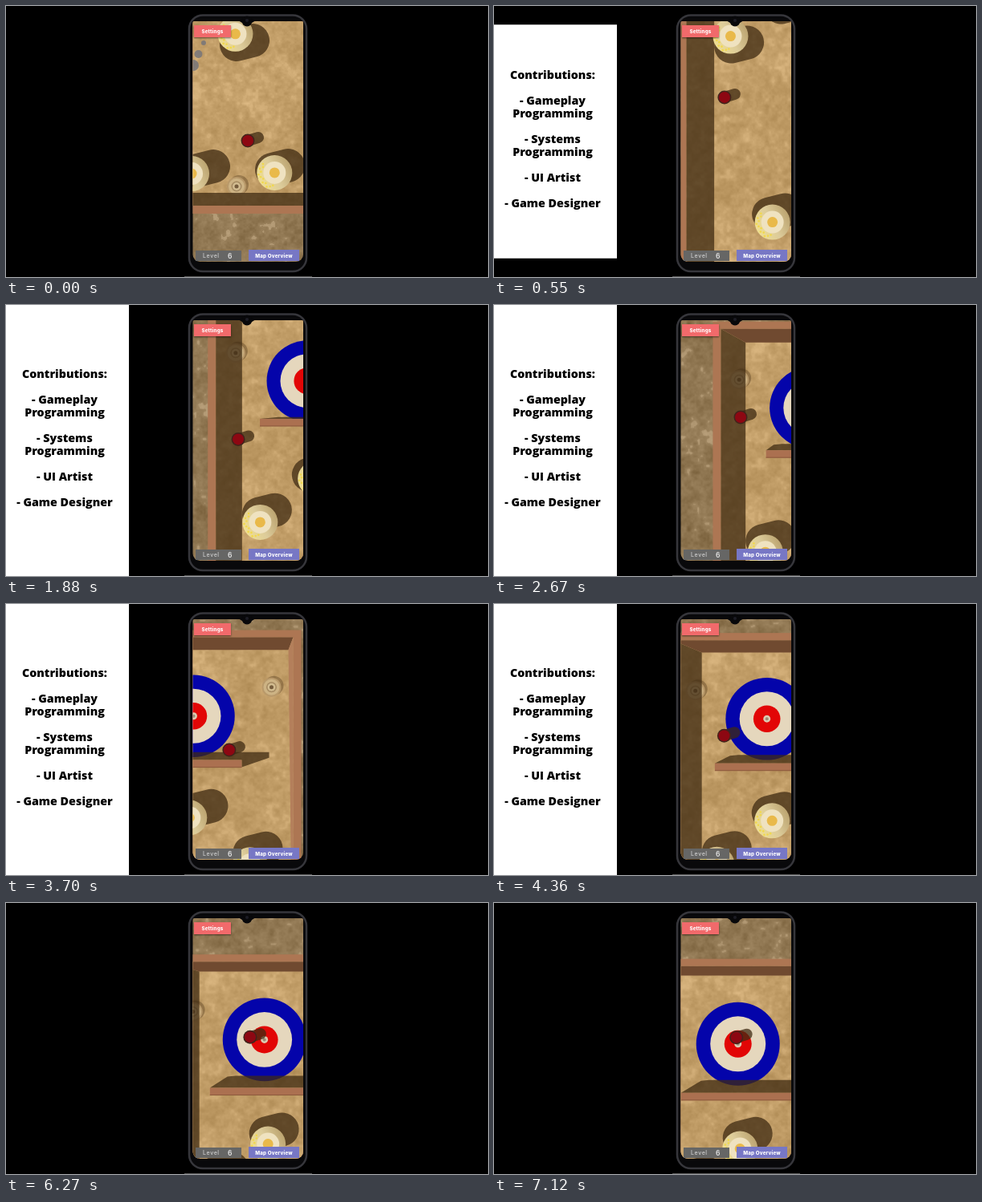
An HTML page with a canvas that plays this animation: 600 px wide and 338 px high, repeating every 7.15 s.

```html
<!DOCTYPE html>
<html lang="en">
<head>
<meta charset="utf-8">
<title>Curling puzzle showcase</title>
<style>
  html, body { margin: 0; width: 100%; height: 100%; overflow: hidden; background: #000; }
  #stage { position: relative; width: 600px; height: 338px; overflow: hidden; background: #000; }
  #stage > * { position: absolute; box-sizing: border-box; }
  canvas { left: 0; top: 0; }
  .ui { font: 800 6.2px/15px Inter, "Open Sans", sans-serif; letter-spacing: .2px; color: #fff; text-align: center; white-space: nowrap; }
  #settings { left: 234px; top: 24px; width: 46px; height: 15px; background: #f16a6b; box-shadow: 0 1px 2px #0008; }
  #map { left: 302px; top: 304px; width: 63px; height: 14px; background: #7777c5; }
  #level { left: 236px; top: 305px; width: 57px; height: 13px; background: #666665; color: #cfcfcf;
    font-weight: 500; font-size: 7px; line-height: 14px; letter-spacing: .6px; text-align: left; padding-left: 9px; }
  #level b { position: absolute; left: 40px; font-size: 8.5px; font-weight: 600; color: #e4e4e4; }
  #panel { left: 0; top: 0; width: 153px; height: 338px; background: #fff; color: #000; margin: 0;
    padding: 78px 7px 0 0; font: 800 14.25px/16px "Open Sans", "Noto Sans", sans-serif; text-align: center; white-space: pre; }
</style>
</head>
<body>
<div id="stage">
  <canvas id="view" width="600" height="338"></canvas>
  <div id="settings" class="ui">Settings</div>
  <div id="level" class="ui">Level<b>6</b></div>
  <div id="map" class="ui">Map Overview</div>
  <div id="panel">Contributions:

- Gameplay
Programming

- Systems
Programming

- UI Artist

- Game Designer</div>
</div>
<script>
const LOOP = 7150, LAG = 200, MID_X = 301, MID_Y = 168;
const g = document.getElementById('view').getContext('2d');
const panel = document.getElementById('panel');

// Shots and bounces of the rock: time, then place relative to the bullseye
const PATH = [
  [60, 1, 495], [805, -104, 92], [1330, -20, 76], [2000, -100, 72], [2456, -100, 72], [2891, -74, -50],
  [3443, 104, 6], [3720, 40, 45], [4710, -104, 8], [5120, -59, 9], [7120, -2, -8]
];
const CUPS = [[2, 117], [-60, 166], [70, 170], [31, 531], [-62, 532], [-13, 375]];
const COINS = [[-89, -35], [97, -36], [-13, 552]];
const SHADE = 'rgba(63,42,18,.74)';

const clamp = v => Math.max(0, Math.min(1, v));
const ease = v => { v = clamp(v); return v * v * (3 - 2 * v); };
// Raised things spread away from the middle of the screen
const rise = (v, mid, k) => mid + (v - mid) * k;

function rockAt(t) {
  let i = 0;
  while (i < PATH.length - 2 && PATH[i + 1][0] <= t) i++;
  const [t0, x0, y0] = PATH[i], [t1, x1, y1] = PATH[i + 1];
  let u = clamp((t - t0) / (t1 - t0));
  if (i === PATH.length - 2) u = 1 - (1 - u) ** 1.5; // glides to rest
  return [x0 + (x1 - x0) * u, y0 + (y1 - y0) * u];
}

// The camera follows the mean place of the rock over the last LAG ms
function bullseyeAt(t) {
  const n = 20;
  let x = MID_X, y = MID_Y;
  for (let i = 0; i < n; i++) {
    const [rx, ry] = rockAt(t - LAG * (i + .5) / n);
    x -= rx / n;
    y -= ry / n;
  }
  return [x, y];
}

function seeded(seed) {
  return () => (seed = (seed * 16807) % 2147483647) / 2147483647;
}

// Tiling mottled ground made from wrapped value noise
function ground(base, amount, streak, seed) {
  const size = 256, tile = document.createElement('canvas');
  tile.width = tile.height = size;
  const c = tile.getContext('2d'), img = c.createImageData(size, size), rnd = seeded(seed);
  const layers = [8, 32, 64, 128].map(n => ({ n, v: Array.from({ length: n * n }, () => rnd() - .5) }));
  const sample = ({ n, v }, x, y) => {
    const fx = x * n / size, fy = y * n / size, x0 = Math.floor(fx), y0 = Math.floor(fy);
    const u = ease(fx - x0), w = ease(fy - y0), at = (p, q) => v[(q % n) * n + p % n];
    return (at(x0, y0) * (1 - u) + at(x0 + 1, y0) * u) * (1 - w)
      + (at(x0, y0 + 1) * (1 - u) + at(x0 + 1, y0 + 1) * u) * w;
  };
  for (let y = 0; y < size; y++) for (let x = 0; x < size; x++) {
    const [a, b, d, e] = layers.map(l => sample(l, x, y));
    let n = (a * .7 + b + d * .7 + e * .4) * amount;
    if (b + d * .8 + a * .5 > .42) n += streak;
    const o = (y * size + x) * 4;
    base.forEach((v, k) => img.data[o + k] = v + n);
    img.data[o + 3] = 255;
  }
  c.putImageData(img, 0, 0);
  return g.createPattern(tile, 'repeat');
}
const sand = ground([193, 157, 103], 19, 4, 11);
const rubble = ground([147, 122, 85], 22, 18, 77);

function disc(x, y, r, fill) {
  g.beginPath();
  g.arc(x, y, r, 0, 7);
  g.fillStyle = fill;
  g.fill();
}
function poly(fill, ...pts) {
  g.beginPath();
  pts.forEach(p => g.lineTo(...p));
  g.fillStyle = fill;
  g.fill();
}
function box(x0, y0, x1, y1, fill) {
  g.fillStyle = fill;
  g.fillRect(x0, y0, x1 - x0, y1 - y0);
}
function texture(x0, y0, x1, y1, pattern, cx, cy) {
  pattern.setTransform(new DOMMatrix().translate(cx, cy));
  box(x0, y0, x1, y1, pattern);
}
// A round shadow drawn out from the foot of a thing
function shadow(x, y, dx, dy, r) {
  g.beginPath();
  g.moveTo(x, y);
  g.lineTo(x + dx, y + dy);
  g.lineCap = 'round';
  g.lineWidth = 2 * r;
  g.strokeStyle = SHADE;
  g.stroke();
}

function arena(cx, cy) {
  const left = rise(cx - 110, MID_X, 1.1), top = rise(cy - 94.5, MID_Y, 1.03);
  const right = cx + 124, bottom = cy + 576;
  const inL = cx - 81, inT = rise(cy - 92, MID_Y, .92), inR = cx + 118, inB = cy + 560;
  texture(230, 17, 372, 321, rubble, cx, cy);
  box(left - 10, top - 9, right + 10, bottom + 10, '#ad7653');
  texture(left, top, right, bottom, sand, cx, cy);
  COINS.forEach(([x, y]) => coin(cx + x, cy + y));
  poly(SHADE, [left, top], [inL, inT], [inL, inB], [left, bottom]);
  poly('#704a30', [left, top], [right, top], [inR, inT], [inL, inT]);
  poly('#b47f5b', [right, top], [inR, inT], [inR + 8, inB], [right, bottom]);
  poly(SHADE, [left, bottom], [inL, inB], [inR, inB], [right, bottom]);
}

function bullseye(cx, cy) {
  const k = 1 + (cy - 176) * .0004;
  [[52, '#0404aa'], [34.5, '#e5d7bd'], [17, '#e20606'], [4.5, '#dccbb2'], [2, '#9b8b78']]
    .forEach(([r, fill]) => disc(cx, cy, r * k, fill));
}

function shelf(cx, cy) {
  const x0 = rise(cx - 61, MID_X, 1.17), x1 = rise(cx + 61, MID_X, 1.17);
  const y = rise(cy + 51, MID_Y, 1.17), base = cy + 45;
  if (y > base) poly(SHADE, [x0, y], [cx - 46, base + 1], [cx - 36, base], [cx + 94, base], [cx + 94, base + 7], [x1, y + 9], [x1, y]);
  box(x0, y, x1, y + 9.5, '#ab7050');
  box(x0, y + 8.5, x1, y + 9.5, '#8d5a3d');
}

function coin(x, y) {
  disc(x + 3, y - 2, 12, 'rgba(70,48,22,.35)');
  [[12, '#b9996a'], [10, '#cdb384'], [6.5, '#a58a61'], [5, '#d2bc90'], [2.5, '#765d3d']]
    .forEach(([r, fill]) => disc(x, y, r, fill));
}

function cup(x, y) {
  const px = rise(x, MID_X, 1.11), py = rise(y, MID_Y, 1.11);
  const glass = g.createLinearGradient(px - 20, py + 10, px + 20, py - 10);
  glass.addColorStop(0, '#f0df92');
  glass.addColorStop(.5, '#dccb9a');
  glass.addColorStop(1, '#bca470');
  disc(px, py, 22, glass);
  for (let i = 0; i < 12; i++) {
    const a = 1.7 + i * .19, r = 16 + (i * 7 % 5);
    disc(px + Math.cos(a) * r, py + Math.sin(a) * r, 1.3, '#f1d84c');
  }
  disc(px, py, 14, '#efe2c0');
  disc(px, py, 6.5, '#e9b94a');
}

function rock(x, y) {
  shadow(x, y, 13, -4, 7);
  disc(x, y, 8.5, '#40241b');
  disc(x, y, 7, '#8d0712');
}

function outline(x, y, w, h, r) {
  g.beginPath();
  g.roundRect(x, y, w, h, r);
}

function phone() {
  outline(228, 11.5, 146, 319.5, 17);
  g.fillStyle = '#09090b';
  g.fill();
  g.strokeStyle = '#36363b';
  g.lineWidth = 2.5;
  g.stroke();
}

function notch() {
  poly('#08080a', [289, 18], [311, 18], [306, 21], [294, 21]);
  disc(300, 19, 6.5, '#08080a');
  disc(300, 18, 2, '#1c1c24');
}

// Fading dots left by the aiming drag
function trail(t, cx, cy) {
  g.globalAlpha = .85 * clamp(1 - t / 260);
  for (let i = 0; i < 3; i++) disc(cx - 67 + 6.5 * i, cy + 401 - 14 * i, 7 - 2 * i, '#77757a');
  g.globalAlpha = 1;
}

function draw(t) {
  const [cx, cy] = bullseyeAt(t), [rx, ry] = rockAt(t);
  g.clearRect(0, 0, 600, 338);
  box(222, 337, 381, 338, '#555');
  phone();
  g.save();
  outline(232.5, 19, 137.5, 300, [2, 2, 9, 9]);
  g.clip();
  arena(cx, cy);
  bullseye(cx, cy);
  CUPS.forEach(([x, y]) => shadow(cx + x, cy + y, 20, -5, 21));
  shelf(cx, cy);
  rock(cx + rx, cy + ry);
  CUPS.forEach(([x, y]) => cup(cx + x, cy + y));
  trail(t, cx, cy);
  g.restore();
  notch();

  const open = ease((t - 60) / 640) * (1 - ease((t - 5070) / 680));
  panel.style.visibility = open > 0 ? 'visible' : 'hidden';
  panel.style.clipPath = `inset(${(1 - open) * 169}px 0)`;
}

const start = performance.now();
function tick() {
  draw((performance.now() - start) % LOOP);
  requestAnimationFrame(tick);
}
tick();
</script>
</body>
</html>
```
